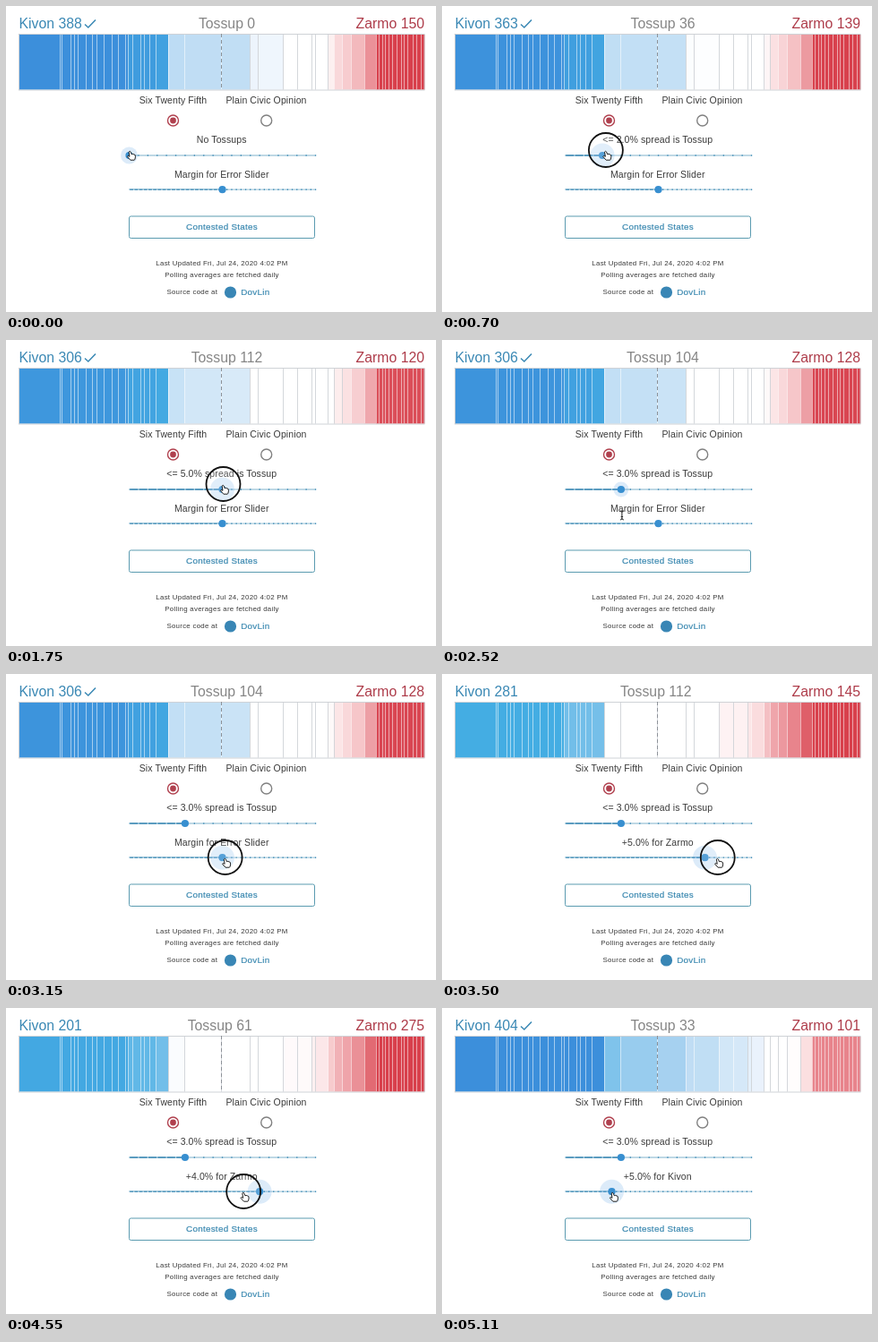
An HTML page for the animation above (5.18 s loop, 480x342 px).

```html
<!DOCTYPE html>
<html lang="en">
<head>
<meta charset="utf-8">
<title>Election slider</title>
<style>
  html, body { margin: 0; width: 100%; height: 100%; overflow: hidden; background: #fff; }
  svg { display: block; width: 480px; height: 342px; }
  text { font: 10.5px "Liberation Sans", Arial, sans-serif; fill: #3a3a3a; letter-spacing: .1px; text-anchor: middle; }
  .title { font-size: 15.8px; letter-spacing: 0; }
  .small { font-size: 7.9px; letter-spacing: .263px; }
  .link { font-size: 9.85px; letter-spacing: .28px; fill: #3a88b0; stroke: #3a88b0; stroke-width: .2px; }
  .blue { fill: #3a88b4; text-anchor: start; }
  .red { fill: #ae3c4a; text-anchor: end; }
  .grey { fill: #858585; }
</style>
</head>
<body>
<svg viewBox="0 0 480 342">
  <text id="left" class="title blue" x="14.5" y="25.3"></text>
  <path id="check" d="M88 20.5 L91.8 24 L100 15.5" fill="none" stroke="#3a88b4" stroke-width="1.5"/>
  <text id="middle" class="title grey" y="25.3"></text>
  <text id="right" class="title red" x="467" y="25.3"></text>

  <g id="bar"></g>
  <rect x="14.5" y="31.5" width="452.5" height="62.5" fill="none" stroke="#c4c8cc" stroke-width=".8"/>
  <path d="M240.5 31V94" stroke="#8d9298" stroke-dasharray="4 3"/>

  <text x="186.5" y="109">Six Twenty Fifth</text>
  <text x="290.5" y="109">Plain Civic Opinion</text>
  <g fill="none" stroke-width="1.4">
    <circle cx="186.5" cy="128" r="6" stroke="#b0404e"/>
    <circle cx="186.5" cy="128" r="3.4" fill="#b0404e"/>
    <circle cx="290.7" cy="128" r="6" stroke="#808080"/>
  </g>
  <text id="spreadLabel" x="240.7" y="152.7"></text>
  <text id="errorLabel" x="240.7" y="191.5"></text>
  <g id="sliders"></g>

  <rect x="137.5" y="235" width="207" height="24.5" rx="2" fill="none" stroke="#5a9bb0"/>
  <text class="link" x="241" y="250">Contested States</text>
  <text class="small" x="241" y="290">Last Updated Fri, Jul 24, 2020 4:02 PM</text>
  <text class="small" x="241" y="303">Polling averages are fetched daily</text>
  <text class="small" x="207.8" y="322">Source code at</text>
  <circle cx="250.5" cy="320" r="6.6" fill="#3986b5"/>
  <text class="link" x="278.3" y="322.7">DovLin</text>

  <g id="cursor">
    <circle id="ring" r="19" fill="#fff" fill-opacity=".15" stroke="#111" stroke-width="1.8"/>
    <path id="hand" transform="translate(0 1) scale(.85)" fill="#fff" stroke="#111" stroke-width="1.1"
      d="M-1.6 1.3Q-.4-.5.9 1.3L2 4.4 3.6 4 5.3 4.6 6.7 5.4Q7.4 8 6.4 10.8L5.6 12H.4L-3.6 7.6Q-3.5 6-1.8 6.8L-.6 7.4Z"/>
    <path id="beam" d="M-2-5Q0-5 0-3.5Q0-5 2-5M0-4V4M-2 5Q0 5 0 3.5Q0 5 2 5M-1.2 1.5H1.2" fill="none" stroke="#222"/>
  </g>
</svg>
<script>
const LOOP = 5180, STEP = 70;
const RAIL_START = 137.5, RAIL_LENGTH = 208;
const BAR_START = 15, BAR_END = 467, VOTES = 538;
const $ = id => document.getElementById(id);

function set(node, attrs) {
  for (const key in attrs) node.setAttribute(key, attrs[key]);
}
function add(parent, tag, attrs) {
  const node = document.createElementNS(parent.namespaceURI, tag);
  set(node, attrs);
  return parent.appendChild(node);
}
const show = (node, on) => node.style.display = on ? '' : 'none';
const mix = (a, b, k) => a + (b - a) * k;
function ease(t, start, end) {
  const k = Math.min(1, Math.max(0, (t - start) / (end - start)));
  return k * k * (3 - 2 * k);
}

// Slider values: tossup threshold, and error margin (positive favours red).
const spreadAt = t => 5 * ease(t, 70, 1600) - 2 * ease(t, 1900, 2350);
const errorAt = t => 10 * ease(t, 3150, 3850) - 15 * ease(t, 4250, 4950);
const toHalf = v => Math.round(v * 2) / 2;
const railX = fraction => RAIL_START + fraction * RAIL_LENGTH;

// Bands of states from blue to red: [right edge, polling margin].
const bands = [
  [136, 24], [167, 21.5], [181, 20.5], [199, 7], [240, 6.5], [272, 6.2], [281, 2.5], [309, 2.4], [325, .8], [341, .7],
  [345, -.4], [359.5, -1.2], [366, -3.5], [375, -5.5], [385, -6.5], [400, -8], [413, -11], [BAR_END, -18]
].map(([end, margin], i, all) => ({ start: i ? all[i - 1][0] : BAR_START, end, margin }));

// Colour ramps: [strength, red, green, blue].
const blueRamp = [
  [1.7, 255, 255, 255], [2.6, 235, 243, 252], [4, 227, 239, 250], [5.5, 196, 224, 245], [10, 176, 212, 241],
  [11, 127, 195, 235], [15.5, 114, 190, 233], [18, 68, 173, 227], [24, 60, 143, 219]
];
const redRamp = [
  [1.8, 255, 255, 255], [4, 253, 235, 236], [8, 243, 185, 189], [13, 229, 119, 128], [17.5, 216, 64, 76]
];
function shade(margin, spread) {
  const ramp = margin > 0 ? blueRamp : redRamp;
  const strength = Math.abs(margin) - spread / 3;
  const next = ramp.findIndex(stop => stop[0] > strength);
  if (next < 1) return ramp.at(next).slice(1);
  const a = ramp[next - 1], b = ramp[next];
  const k = (strength - a[0]) / (b[0] - a[0]);
  return a.slice(1).map((v, i) => Math.round(mix(v, b[i + 1], k)));
}

const bar = $('bar');
for (const band of bands) {
  band.rect = add(bar, 'rect', { x: band.start, y: 32, width: band.end - band.start + .3, height: 61.5 });
  band.lines = [];
}
function addLine(x) {
  const band = bands.find(b => x < b.end);
  band.lines.push(add(bar, 'path', { d: `M${Math.floor(x) + .5} 32V93.5`, 'stroke-width': .9 }));
}
let seed = 7;
const random = () => (seed = seed * 16807 % 2147483647) / 2147483647;
bands.slice(1).forEach(band => addLine(band.start));
for (let x = 60; x < 167; x += 2 + 9 * random()) addLine(x);
for (let x = 416; x < 465; x += 2.5 + 3 * random()) addLine(x);

function drawBar(t) {
  const spread = spreadAt(t), error = errorAt(t);
  for (const { margin, rect, lines } of bands) {
    const color = shade(margin - error, spread);
    const pale = Math.min(...color) > 222;
    set(rect, { fill: `rgb(${color})` });
    for (const line of lines) set(line, { stroke: pale ? '#d0d3d7' : '#fff', 'stroke-opacity': pale ? 1 : .6 });
  }
}

function tally(t) {
  const spread = toHalf(spreadAt(t)), error = toHalf(errorAt(t));
  const votes = [0, 0, 0];
  for (const { start, end, margin } of bands) {
    const lead = margin - error;
    const side = Math.abs(lead) < spread ? 1 : lead > 0 ? 0 : 2;
    votes[side] += (end - start) * VOTES / (BAR_END - BAR_START);
  }
  return votes;
}
// Counters trail the sliders: a moving average of the recent tallies.
function shownTally(t) {
  const recent = Array.from({ length: 6 }, (_, i) => tally(t - i * STEP));
  return [0, 1, 2].map(side => Math.round(recent.reduce((sum, v) => sum + v[side], 0) / recent.length));
}

function makeSlider(y, steps) {
  const group = $('sliders');
  const line = color => add(group, 'path', { d: `M${railX(0)} ${y}H${railX(1)}`, stroke: color, 'stroke-width': 1.3 });
  line('#a9cbdd');
  const track = line('#3a89b4');
  const marks = Array.from({ length: steps + 1 }, (_, i) =>
    add(group, 'rect', { x: railX(i / steps) - .6, y: y - .7, width: 1.3, height: 1.4 }));
  const halo = add(group, 'circle', { cy: y, fill: '#3c8fdb', 'fill-opacity': .18 });
  const thumb = add(group, 'circle', { cy: y, r: 4.1, fill: '#388fd0' });
  return (fraction, haloRadius) => {
    const x = railX(fraction);
    set(track, { d: `M${RAIL_START} ${y}H${x}` });
    marks.forEach((mark, i) => set(mark, { fill: i / steps <= fraction ? '#d5e7f0' : '#3a89b4' }));
    set(halo, { cx: x, r: haloRadius });
    set(thumb, { cx: x });
  };
}
const drawSpread = makeSlider(167, 20);
const drawError = makeSlider(205.2, 40);

function drawCursor(t) {
  const ahead = t + 60;
  const x = 1 + mix(railX(spreadAt(ahead) / 10), railX((errorAt(ahead) + 10) / 20), ease(t, 2560, 2900));
  const y = mix(161, 205, ease(t, 2350, 2590));
  const overText = y > 180 && y < 198;
  set($('cursor'), { transform: `translate(${x} ${y})` });
  show($('ring'), (t >= 70 && t < 2350) || (t >= 3000 && t < 4970));
  show($('hand'), !overText);
  show($('beam'), overText);
}

function draw(t) {
  const spread = toHalf(spreadAt(t)), error = toHalf(errorAt(t));
  const [blue, open, red] = shownTally(t);
  const won = tally(t)[0] >= 270;

  $('left').textContent = `Kivon ${blue}`;
  $('middle').textContent = `Tossup ${open}`;
  $('right').textContent = `Zarmo ${red}`;
  set($('middle'), { x: won ? 246.5 : 238.7 });
  show($('check'), won);

  $('spreadLabel').textContent = spread ? `<= ${spread.toFixed(1)}% spread is Tossup` : 'No Tossups';
  $('errorLabel').textContent = error
    ? `+${Math.abs(error).toFixed(1)}% for ${error > 0 ? 'Zarmo' : 'Kivon'}` : 'Margin for Error Slider';

  drawBar(t);
  drawSpread(spread / 10, t < 70 ? 9.5 : t < 2350 ? 13.5 : t < 2800 ? 8.5 : 0);
  drawError((error + 10) / 20, t < 2800 ? 0 : 13.5);
  drawCursor(t);
}

function tick() {
  const t = performance.now() % LOOP;
  draw(Math.floor(t / STEP) * STEP);
  requestAnimationFrame(tick);
}
tick();
</script>
</body>
</html>
```
